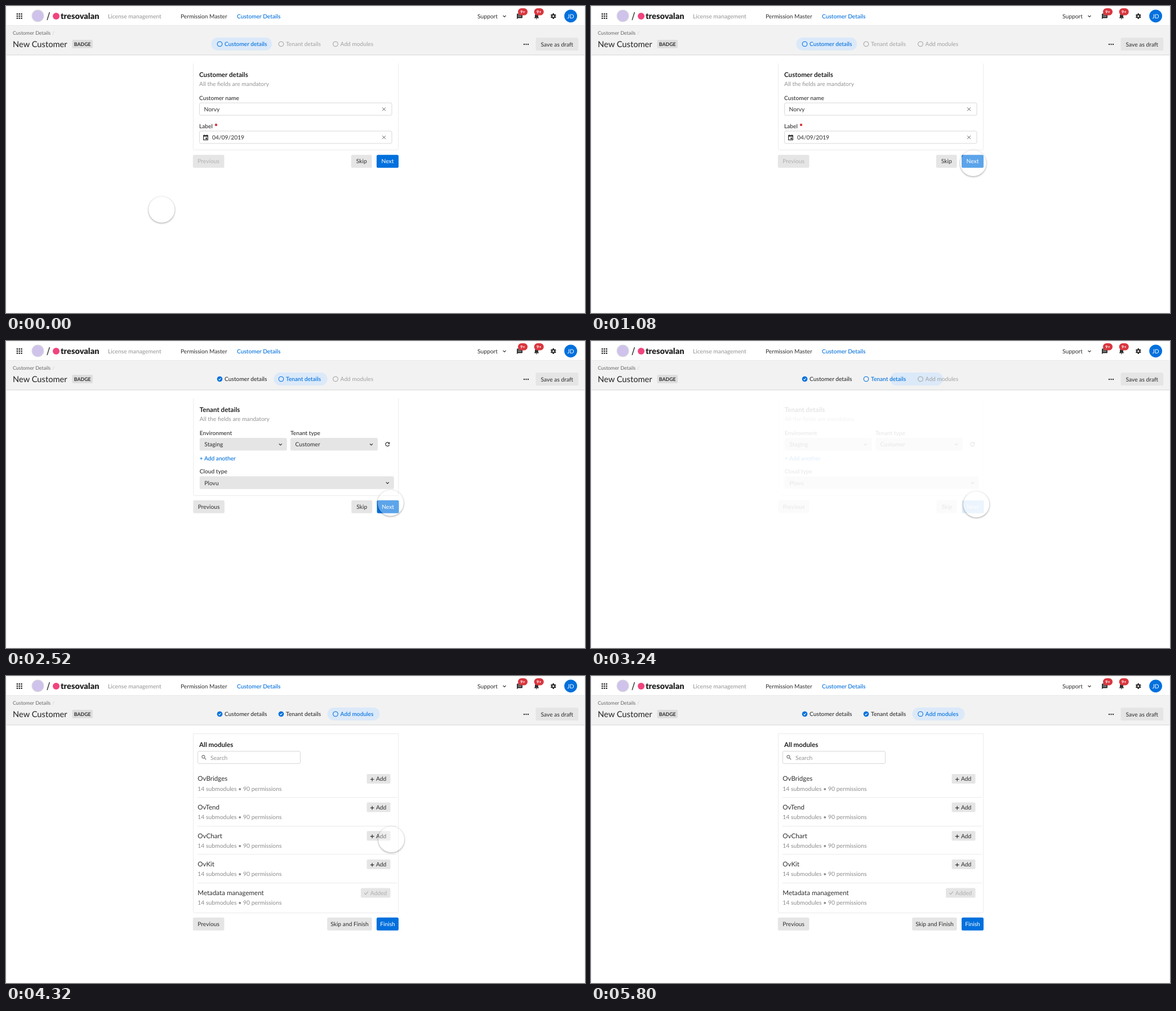
An HTML page that plays this animation: 1028x545 px, repeating every 5840 ms.

```html
<!DOCTYPE html>
<html lang="en">
<head>
<meta charset="utf-8">
<title>New customer wizard</title>
<style>
html, body { margin: 0; width: 100%; height: 100%; overflow: hidden; background: #fff; }
svg { display: block; font-family: Lato, "Open Sans", sans-serif; text-rendering: geometricPrecision; }
#cursor {
  position: absolute; left: -22.7px; top: -22.7px; width: 45.4px; height: 45.4px; border-radius: 50%;
  background: rgba(255, 255, 255, .36); box-shadow: 0 1px 3px 0.5px rgba(0, 0, 0, .3);
}
</style>
</head>
<body>
<svg id="stage" width="1028" height="545" viewBox="0 0 1028 545"></svg>
<div id="cursor"></div>
<script>
const LOOP = 5840, STEP_TIMES = [1190, 3170];
const BLUE = '#0070dd', INK = '#2f2f2f', GREY = '#949494', PALE = '#b0b0b0', FILL = '#e5e5e5', LINE = '#ebebeb';

// Drawing helpers; text is centred vertically on y
const text = (x, y, s, { size = 10.3, fill = INK, weight = 400, anchor = 'start' } = {}) =>
  `<text x="${x}" y="${y + size * .36}" font-size="${size}" fill="${fill}" font-weight="${weight}" text-anchor="${anchor}">${s}</text>`;
const rect = (x, y, w, h, fill, r = 0, stroke = 'none') =>
  `<rect x="${x}" y="${y}" width="${w}" height="${h}" rx="${r}" fill="${fill}" stroke="${stroke}"/>`;
const circle = (x, y, r, fill, stroke = 'none') =>
  `<circle cx="${x}" cy="${y}" r="${r}" fill="${fill}" stroke="${stroke}" stroke-width="1.1"/>`;
const path = (x, y, d, stroke = INK, width = 1.2, fill = 'none') =>
  `<path transform="translate(${x} ${y})" d="${d}" stroke="${stroke}" stroke-width="${width}" fill="${fill}"/>`;
const group = (id, body) => `<g id="${id}">${body}</g>`;

const chevron = (x, y) => path(x, y, 'M-2.5-1.2L0 1.3 2.5-1.2');
const cross = (x, y) => path(x, y, 'M-3-3L3 3M3-3L-3 3', '#666', 1);
const tick = (x, y, color, k = 1) => path(x, y, `M${-2 * k} 0L${-.6 * k} ${1.5 * k} ${2.2 * k} ${-1.6 * k}`, color, 1.1);
const button = (x, y, w, h, label, fill = FILL, color = INK) =>
  rect(x, y, w, h, fill, 2.5) + text(x + w / 2, y + h / 2, label, { fill: color, anchor: 'middle' });
const heading = (x, s) => text(x, 121.5, s, { size: 11.6, weight: 700, fill: '#222' });
const subtitle = x => text(x, 138.5, 'All the fields are mandatory', { fill: GREY });
const label = (x, y, s) => text(x, y, s, { size: 10.2, weight: 500 });
const input = (x, y, w) => rect(x + .5, y + .5, w - 1, 22, '#fff', 2.5, '#d8d8d8');
const select = (x, y, w, s) => rect(x, y, w, 22.5, FILL, 2.5) + text(x + 8.5, y + 11.5, s) + chevron(x + w - 11.5, y + 11.5);
const frame = (x, bottom) => path(x, 0, `M.5 102V${bottom - 2}q0 2 2 2H362.5q2 0 2-2V102`, LINE, 1);
const topEdge = x => path(x, 102.5, 'M.5 0H364.5', LINE, 1);

function badge(x) {
  return rect(x, 4, 17, 12.6, '#d9363e', 6.3) +
    text(x + 8.5, 10.5, '9+', { size: 7.2, weight: 700, fill: '#fff', anchor: 'middle' });
}

function gear(x, y) {
  const teeth = [0, 60, 120].map(a => `<rect x="-1.2" y="-5" width="2.4" height="10" transform="rotate(${a})"/>`).join('');
  return `<g transform="translate(${x} ${y})" fill="${INK}">${teeth}<circle r="3.7"/><circle r="1.6" fill="#fff"/></g>`;
}

function header() {
  let s = rect(0, 35, 1028, 52, '#f2f2f2') + rect(0, 34, 1028, 1, '#e9e9e9') +
    rect(0, 86, 1028, 1, '#e2e2e2') + rect(0, 87, 1028, 1, '#ececec') + rect(0, 0, 1028, 1, '#f0f0f0') +
    rect(0, 0, 1, 545, '#f0f0f0') + rect(1027, 0, 1, 545, '#f0f0f0') + rect(0, 544, 1028, 1, '#f8f8f8');
  for (let i = 0; i < 9; i++) s += rect(18.8 + i % 3 * 3.8, 13 + Math.floor(i / 3) * 3.8, 2.4, 2.4, INK);
  s += circle(56.5, 17.5, 10.5, '#cfc3ec', '#d9d9d9') + path(75, 18, 'M-2 7L2.4-7', '#333', 1.4) +
    circle(89, 18, 6, '#f0447e') +
    text(97, 18, 'tresovalan', { size: 14.6, weight: 900, fill: '#222' }) +
    text(181, 18, 'License management', { fill: GREY }) +
    text(310, 18, 'Permission Master', { size: 10.2 }) +
    text(410, 18, 'Customer Details', { fill: BLUE, size: 10.2, weight: 500 }) +
    text(837, 18, 'Support') + chevron(885, 18) +
    path(907, 13.5, 'M0 1Q0 0 1 0H9Q10 0 10 1V7Q10 8 9 8H2L0 10Z', 'none', 0, INK) +
    path(908.8, 16, 'M0 0H6.4M0 2.6H6.4', '#fff', .7) + badge(909) +
    path(942, 18, 'M-4 3.5V2.8L-3 1.8V-1C-3-5.5 3-5.5 3-1V1.8L4 2.8V3.5ZM-1.2 4.2H1.2Q1 5.4 0 5.4T-1.2 4.2Z', 'none', 0, INK) + badge(937.7) +
    gear(971.8, 18) + circle(1002.6, 17.8, 11.4, BLUE) +
    text(1002.6, 17.9, 'JD', { fill: '#fff', anchor: 'middle' });
  s += text(12, 47.5, 'Customer Details', { size: 8.9, fill: '#666' }) + text(82, 47.5, '/', { size: 8.9, fill: '#ccc' }) +
    text(12, 68, 'New Customer', { size: 14.7, fill: '#222' }) +
    rect(117.5, 60, 36.5, 15, '#dedede', 2) + text(135.7, 67.6, 'BADGE', { size: 8.8, weight: 700, anchor: 'middle' });
  for (const x of [920, 923.5, 927]) s += circle(x, 68, 1.2, INK);
  return s + button(940.5, 56.3, 75.7, 23, 'Save as draft');
}

function stepLabels(current) {
  const steps = [[379.5, 'Customer details'], [488.5, 'Tenant details'], [585, 'Add modules']];
  return steps.map(([x, name], i) => {
    const fill = i < current ? INK : i === current ? BLUE : '#a2a2a2';
    const icon = i < current ? circle(x, 67.5, 4.8, BLUE) + tick(x, 67.6, '#fff') : circle(x, 67.5, 4.3, 'none', fill);
    return icon + text(x + 8.6, 67.3, name, { fill, weight: i > current ? 400 : 500, size: 10.2 });
  }).join('');
}

function customerCard() {
  return frame(332, 255.5) + heading(343, 'Customer details') + subtitle(343) +
    label(343, 163.5, 'Customer name') + input(343, 171.5, 342.5) + text(351.5, 183.3, 'Norvy') + cross(671, 183.2) +
    label(343, 213.3, 'Label') + circle(373, 211, 2.2, '#d9363e') + input(343, 221.5, 342.5) +
    path(350, 228.5, 'M.6 1.5H8.4V9.2H.6ZM2.3 0V2M6.7 0V2', INK, 1.2) + rect(350, 229.4, 9, 2.4, INK) + rect(354.3, 233.6, 2.8, 2.8, INK) +
    text(366, 233.2, '04/09/2019') + cross(671, 233.2) +
    button(331.8, 264.2, 55.7, 23, 'Previous', FILL, PALE) + button(612.8, 264.2, 36.8, 23, 'Skip') +
    button(658, 264.2, 39, 23, 'Next', BLUE, '#fff');
}

function tenantCard() {
  return group('tenantEdge', topEdge(332.4)) + frame(332.4, 274.5) + heading(343.8, 'Tenant details') + subtitle(343.8) +
    label(343.8, 163.5, 'Environment') + select(343.8, 172, 155, 'Staging') +
    label(505, 163.5, 'Tenant type') + select(505, 172, 155, 'Customer') +
    path(677.3, 183.2, 'M2.4-2.4A3.4 3.4 0 1 0 3.3 1', INK, 1.2) + path(677.3, 183.2, 'M4-4V-.4H.4Z', 'none', 0, INK) +
    text(343.8, 208, '+ Add another', { fill: BLUE, weight: 500, size: 10.2 }) +
    label(343.8, 231.8, 'Cloud type') + select(343.8, 240.3, 345, 'Plovu') +
    button(332.4, 282.7, 55.5, 23, 'Previous') + button(613.3, 282.7, 37, 23, 'Skip') +
    button(658.6, 282.7, 39, 23, 'Next', BLUE, '#fff');
}

function modulesCard() {
  const rows = ['OvBridges', 'OvTend', 'OvChart', 'OvKit', 'Metadata management'].map((name, i) => {
    const y = 182.3 + i * 50.6;
    const action = i < 4
      ? rect(640.5, y - 8.3, 42, 17, FILL, 2) + path(650.2, y + 1.2, 'M-3.3 0H3.3M0-3.3V3.3') + text(657, y + .3, 'Add')
      : rect(630, y - 8.3, 52.5, 17, FILL, 2) + tick(639.5, y + .5, PALE, 1.6) + text(646.8, y + .3, 'Added', { fill: PALE });
    return text(340.3, y, name, { size: 11.6 }) +
      text(340.3, y + 17.6, '14 submodules • 90 permissions', { size: 10.4, fill: '#8c8c8c' }) + action +
      (i < 4 ? rect(340, Math.round(y + 32.7), 354, 1, LINE) : '');
  }).join('');
  return topEdge(332) + frame(332, 420.5) + heading(343, 'All modules') + input(340, 133, 183) +
    circle(350.4, 143.4, 2.5, 'none', '#777') + path(352.2, 145.2, 'M0 0L3 3', '#777', 1.3) +
    text(363, 144.8, 'Search', { fill: GREY }) + rows +
    button(331.8, 428.7, 55.7, 23, 'Previous') + button(570.2, 428.7, 79.5, 23, 'Skip and Finish') +
    button(658, 428.7, 39, 23, 'Finish', BLUE, '#fff');
}

const $ = id => document.getElementById(id);
$('stage').innerHTML = header() + '<rect id="pill" y="56" height="22.8" rx="11.4" fill="#dbe9f9"/>' +
  [0, 1, 2].map(i => group('steps' + i, stepLabels(i))).join('') +
  [customerCard, tenantCard, modulesCard].map((card, i) => group('card' + i, card())).join('');

const progress = (t, start, length) => Math.min(1, Math.max(0, (t - start) / length));
const easeInOut = u => u < .5 ? 2 * u * u : 1 - 2 * (1 - u) ** 2;
const easeOut = u => 1 - (1 - u) ** 3;
const PILLS = [[364.5, 107.5], [475.5, 95], [570.7, 92.8]];
// Cursor legs: start, duration, dx, dy
const MOVES = [[0, 640, 402.3, -82.5], [1600, 1400, 5.5, 11], [5000, 520, 0, 290]];

function render() {
  const t = performance.now() % LOOP;
  let pill = PILLS[0], current = 0;
  STEP_TIMES.forEach((start, i) => {
    const u = easeOut(progress(t, start, 280));
    pill = pill.map((v, k) => v + (PILLS[i + 1][k] - v) * u);
    if (t >= start + 80) current = i + 1;
  });
  $('pill').setAttribute('x', pill[0]);
  $('pill').setAttribute('width', pill[1]);

  for (let i = 0; i < 3; i++) {
    const shown = i ? progress(t, STEP_TIMES[i - 1] + 80, 240) : 1;
    const gone = i < 2 ? progress(t, STEP_TIMES[i], 80) : 0;
    $('card' + i).setAttribute('opacity', shown * (1 - gone));
    $('card' + i).setAttribute('transform', `translate(${5 * (1 - shown)} 0)`);
    $('steps' + i).setAttribute('visibility', i === current ? 'visible' : 'hidden');
  }
  $('tenantEdge').setAttribute('opacity', 1 - progress(t, 1510, 100));

  let x = 276.3, y = 361.5;
  for (const [start, length, dx, dy] of MOVES) {
    const u = easeInOut(progress(t, start, length));
    x += dx * u;
    y += dy * u;
  }
  $('cursor').style.transform = `translate(${x}px, ${y}px)`;
  requestAnimationFrame(render);
}
render();
</script>
</body>
</html>
```
